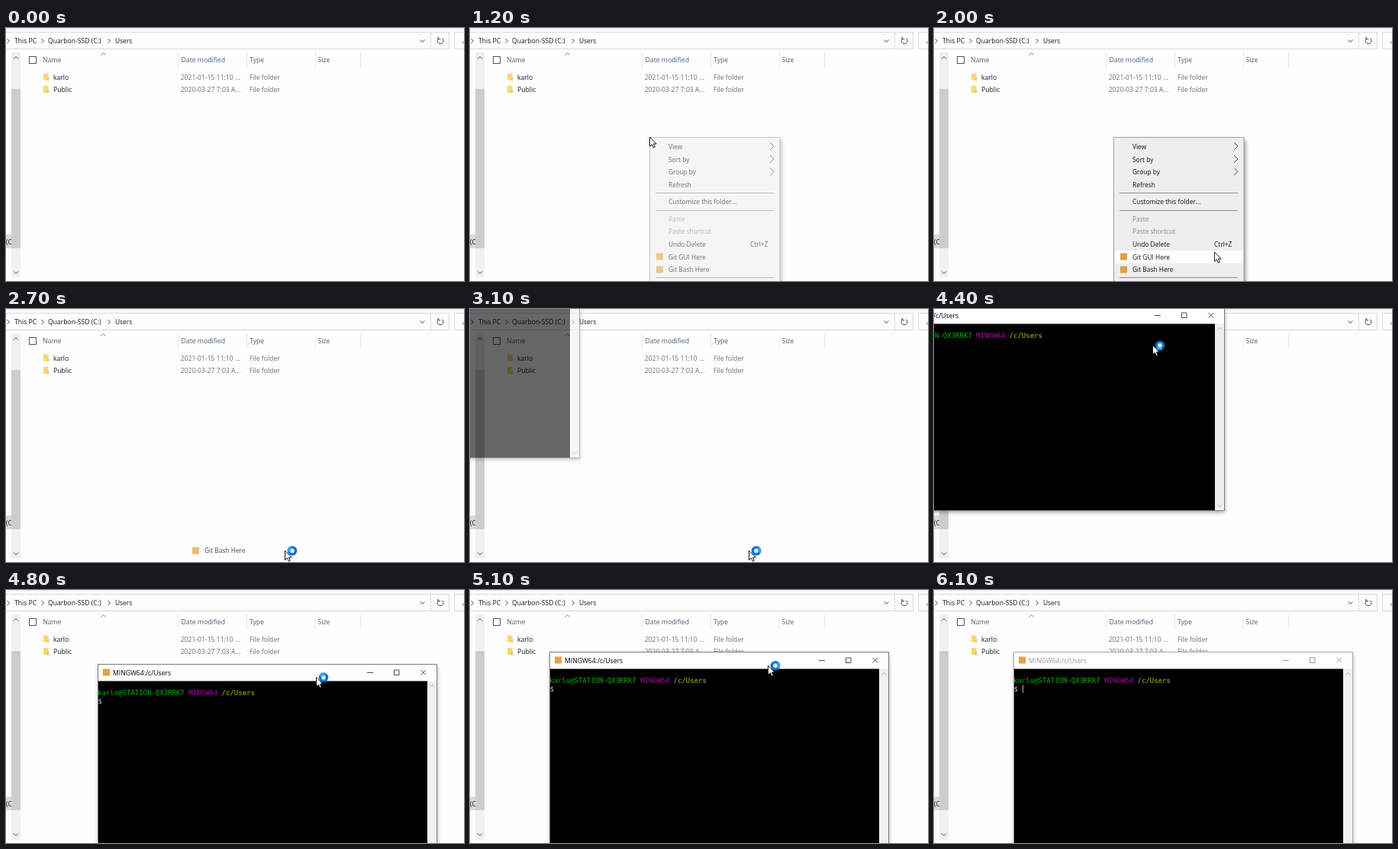
Write an HTML page that moves like this. It is 600x332 px and loops after 6200 ms.

```html
<!DOCTYPE html>
<html lang="en">
<head>
<meta charset="utf-8">
<title>Open a shell from a folder</title>
<style>
html, body { margin: 0; width: 100%; height: 100%; overflow: hidden; background: #fefefe; }
svg { display: block; width: 600px; height: 332px; font: 8.6px "Open Sans", "Noto Sans", sans-serif; }
.line { fill: none; stroke: #d9d9d9; }
.faint { fill: none; stroke: #e5e5e5; }
.icon { fill: none; stroke: #4a4a4a; }
.head { fill: #4c607a; font-size: 8.7px; }
.soft { fill: #6d6d6d; }
.name { fill: #1a1a1a; }
.menu-text { font-size: 8.4px; fill: #111; }
.off { fill: #8a8a8a; }
.prompt { font: 9px "DejaVu Sans Mono", "Liberation Mono", monospace; white-space: pre; }

/* Every pose holds until the next one. */
.menu, .hover, .chosen, .shell, .pointer, .ring, .active, .idle, .caret {
  animation: 6.2s step-end infinite;
}
.menu { animation-name: menu; }
.hover { animation-name: hover; }
.chosen { animation-name: chosen; }
.shell { animation-name: shell-move, shell-show; }
.pointer { animation-name: pointer-move, pointer-show; }
.ring { animation-name: ring; }
.active { animation-name: active; }
.idle { animation-name: idle; }
.caret { animation-name: caret; }
.arc { animation: spin 1s steps(10) infinite; }

@keyframes menu {
  0% { opacity: 0; }
  19.35% { opacity: .6; }
  20.96% { opacity: 1; }
  43.54%, 100% { opacity: 0; }
}
@keyframes hover {
  0% { transform: translateY(147px); opacity: 0; }
  24.19% { transform: translateY(147px); opacity: 1; }
  27.41% { transform: translateY(164px); opacity: 1; }
  29.03% { transform: translateY(220px); opacity: 1; }
  30.64% { transform: translateY(259px); opacity: 1; }
  32.25% { transform: translateY(292px); opacity: 1; }
  37.09%, 100% { transform: translateY(308.5px); opacity: 1; }
}
@keyframes chosen {
  0% { opacity: 0; }
  43.54% { opacity: .75; }
  45.16% { opacity: .4; }
  46.77% { opacity: .12; }
  48.38%, 100% { opacity: 0; }
}
@keyframes shell-show {
  0% { opacity: 0; }
  49.99% { opacity: .6; }
  51.61%, 100% { opacity: 1; }
}
@keyframes shell-move {
  0% { transform: translate(-301px, -72px); }
  70.96% { transform: translate(-64px, -3px); }
  72.58% { transform: translate(19px, 41px); }
  74.19% { transform: translate(77px, 75px); }
  75.80% { transform: translate(111px, 93px); }
  77.41% { transform: translate(120px, 97px); }
  79.03% { transform: translate(112px, 89px); }
  80.64% { transform: translate(106px, 82px); }
  82.25%, 100% { transform: translate(104px, 81px); }
}
@keyframes pointer-show {
  0% { opacity: 0; }
  1.61% { opacity: 1; }
  56.45% { opacity: 0; }
  70.96% { opacity: 1; }
  95.16%, 100% { opacity: 0; }
}
@keyframes pointer-move {
  0% { transform: translate(478px, 272px); }
  3.22% { transform: translate(440px, 250px); }
  4.83% { transform: translate(380px, 216px); }
  6.45% { transform: translate(318px, 183px); }
  8.06% { transform: translate(270px, 160px); }
  9.67% { transform: translate(243px, 147px); }
  11.29% { transform: translate(235px, 143px); }
  22.58% { transform: translate(237px, 145px); }
  24.19% { transform: translate(242px, 151px); }
  27.41% { transform: translate(262px, 170px); }
  29.03% { transform: translate(310px, 226px); }
  30.64% { transform: translate(352px, 270px); }
  32.25% { transform: translate(367px, 294px); }
  33.87% { transform: translate(370px, 300px); }
  35.48% { transform: translate(367px, 306px); }
  37.09% { transform: translate(364px, 310px); }
  38.70% { transform: translate(364px, 311px); }
  43.54% { transform: translate(365px, 317px); }
  53.22% { transform: translate(359px, 312px); }
  54.83% { transform: translate(153px, 128px); }
  70.96% { transform: translate(286px, 47.5px); }
  72.58% { transform: translate(344px, 84px); }
  74.19% { transform: translate(384px, 104px); }
  75.80% { transform: translate(401px, 112px); }
  77.41% { transform: translate(406px, 114.5px); }
  79.03% { transform: translate(396px, 106px); }
  80.64% { transform: translate(391px, 100px); }
  82.25%, 100% { transform: translate(390px, 99px); }
}
@keyframes ring {
  0% { opacity: 0; }
  43.54% { opacity: 1; }
  56.45% { opacity: 0; }
  70.96% { opacity: 1; }
  87.09%, 100% { opacity: 0; }
}
@keyframes active { 0% { opacity: 1; } 95.16%, 100% { opacity: 0; } }
@keyframes idle { 0% { opacity: 0; } 95.16%, 100% { opacity: 1; } }
@keyframes caret { 0% { opacity: 0; } 87.09%, 100% { opacity: 1; } }
@keyframes spin { to { transform: rotate(360deg); } }
</style>
</head>
<body>
<svg viewBox="0 0 600 332">
  <defs>
    <filter id="blur" x="-10%" y="-10%" width="120%" height="120%"><feGaussianBlur stdDeviation="2.5"/></filter>
    <path id="right" d="M-1.5-3L1.5 0L-1.5 3"/>
    <path id="down" d="M-3-1.5L0 1.5L3-1.5"/>
    <path id="up" d="M-3 1.5L0-1.5L3 1.5"/>
    <path id="more" d="M-2.5-5L2.5 0L-2.5 5"/>
    <path id="buttons" d="M353 11.5H361M388.5 8H395V14.5H388.5ZM423.5 8L430 14.5M430 8L423.5 14.5"/>
    <g id="folder">
      <path d="M0 0H6.5V9H0Z" fill="#f8d775"/>
      <path d="M5 5H7V9.5H5Z" fill="#efc65c"/>
    </g>
    <rect id="badge" x="-4.5" y="-4.5" width="9" height="9" fill="#e0a245"/>
    <g id="bash-item">
      <use href="#badge" x="248.5" y="317"/>
      <text class="menu-text" x="260" y="320">Git Bash Here</text>
    </g>
  </defs>

  <!-- address bar -->
  <rect width="600" height="332" fill="#fefefe"/>
  <path class="faint" d="M0 1H600"/>
  <path class="line" d="M0 5.5H580.5V27.5H0M556.5 5.5V27.5M600 5.5H587.5V27.5H600"/>
  <g class="icon">
    <use href="#right" x="3" y="17"/>
    <use href="#right" x="48" y="17"/>
    <use href="#right" x="135" y="17"/>
    <use href="#down" x="545.5" y="17"/>
    <path d="M571.5 13.6A4 4 0 1 1 566.5 13.6M566 11.5V14.5H569"/>
    <path d="M598 20L600 18"/>
  </g>
  <g class="name">
    <text x="11" y="20">This PC</text>
    <text x="55" y="20">Quarbon-SSD (C:)</text>
    <text x="143" y="20" font-size="8.4">Users</text>
  </g>

  <!-- file list -->
  <path class="faint" d="M225.5 32V52M315.5 32V52M405.5 32V52M464.5 32V52"/>
  <rect x="30.5" y="37.5" width="9" height="9" fill="#fff" stroke="#555"/>
  <use href="#up" class="icon" x="127.5" y="34" style="stroke:#888"/>
  <g class="head">
    <text x="48" y="45.3">Name</text>
    <text x="229.5" y="45.3">Date modified</text>
    <text x="319" y="45.3">Type</text>
    <text x="408.5" y="45.3">Size</text>
  </g>
  <use href="#folder" x="49" y="59.5"/>
  <use href="#folder" x="49" y="76"/>
  <g class="name">
    <text x="62" y="68">karlo</text>
    <text x="62" y="84">Public</text>
  </g>
  <g class="soft">
    <text x="228.7" y="68">2021-01-15 11:10 ...</text>
    <text x="228.7" y="84">2020-03-27 7:03 A...</text>
    <text x="319" y="68">File folder</text>
    <text x="319" y="84">File folder</text>
  </g>

  <!-- side pane scrollbar -->
  <rect x="0" y="271" width="7" height="18" fill="#d9d9d9"/>
  <text class="name" x="0" y="283.5">(C</text>
  <rect x="7" y="32" width="12" height="296" fill="#f0f0f0"/>
  <rect x="7" y="80" width="12" height="209" fill="#cdcdcd"/>
  <g class="icon">
    <use href="#up" x="13" y="39"/>
    <use href="#down" x="13" y="321"/>
  </g>

  <!-- context menu -->
  <g class="menu">
    <rect x="239" y="147" width="169" height="200" opacity=".45" filter="url(#blur)"/>
    <rect x="235.5" y="143.5" width="170.5" height="200" fill="#eee" stroke="#a3a3a3"/>
    <rect class="hover" x="237" width="168" height="16.5" fill="#fff"/>
    <path class="line" style="stroke:#909090" d="M243 216.5H398M243 239.5H398M243 327.5H398"/>
    <g class="menu-text">
      <text x="260" y="158.5">View</text>
      <text x="260" y="175.5">Sort by</text>
      <text x="260" y="192">Group by</text>
      <text x="260" y="209">Refresh</text>
      <text x="260" y="231">Customize this folder...</text>
      <text x="260" y="253.5" class="off">Paste</text>
      <text x="260" y="270" class="off">Paste shortcut</text>
      <text x="260" y="286.5">Undo Delete</text>
      <text x="367" y="286.5">Ctrl+Z</text>
      <text x="260" y="303.5">Git GUI Here</text>
    </g>
    <use href="#badge" x="248.5" y="300"/>
    <use href="#bash-item"/>
    <g class="icon">
      <use href="#more" x="395.5" y="155"/>
      <use href="#more" x="395.5" y="172"/>
      <use href="#more" x="395.5" y="188.5"/>
    </g>
  </g>
  <use class="chosen" href="#bash-item"/>

  <!-- terminal window -->
  <g class="shell">
    <rect class="shade" x="1" y="3" width="444" height="267" opacity=".35" filter="url(#blur)"/>
    <rect width="445" height="268" fill="#fff"/>
    <rect y="22.5" width="432" height="244.5"/>
    <rect x="432" y="22.5" width="12.5" height="244.5" fill="#f0f0f0"/>
    <g fill="none">
      <rect class="active" x=".5" y=".5" width="444" height="267" stroke="#7c7c7c"/>
      <rect class="idle" x=".5" y=".5" width="444" height="267" stroke="#aaa"/>
    </g>
    <use href="#badge" x="11.5" y="11"/>
    <g class="active">
      <text x="20" y="14.5">MINGW64:/c/Users</text>
      <use class="icon" href="#buttons"/>
    </g>
    <g class="idle">
      <text x="20" y="14.5" fill="#999">MINGW64:/c/Users</text>
      <use class="icon" href="#buttons" style="stroke:#999"/>
    </g>
    <g class="icon" style="stroke:#aaa">
      <use href="#up" x="438.3" y="29"/>
      <use href="#down" x="438.3" y="261"/>
    </g>
    <text class="prompt" x="0" y="41"><tspan fill="#00b400">karlo@STATION-QX3RRK7 </tspan><tspan fill="#b000b0">MINGW64 </tspan><tspan fill="#bfbf00">/c/Users</tspan></text>
    <text class="prompt" x=".5" y="51.5" fill="#bfbfbf">$</text>
    <rect class="caret" x="12" y="44" width="1" height="10" fill="#aaa"/>
  </g>

  <!-- mouse pointer -->
  <g class="pointer">
    <path d="M.5 0V12.3L3.3 9.7L5.3 14L7.3 13.1L5.4 9H9.2Z" fill="#fff" stroke="#000" stroke-width=".9"/>
    <g class="ring" fill="none" stroke-width="3.4">
      <g transform="translate(10 .3)">
        <circle r="4.6" fill="#d6eaf8" stroke="#0b72c4"/>
        <path class="arc" d="M0-4.6A4.6 4.6 0 0 1 4.6 0" stroke="#35a3ea"/>
      </g>
    </g>
  </g>
</svg>
</body>
</html>
```
